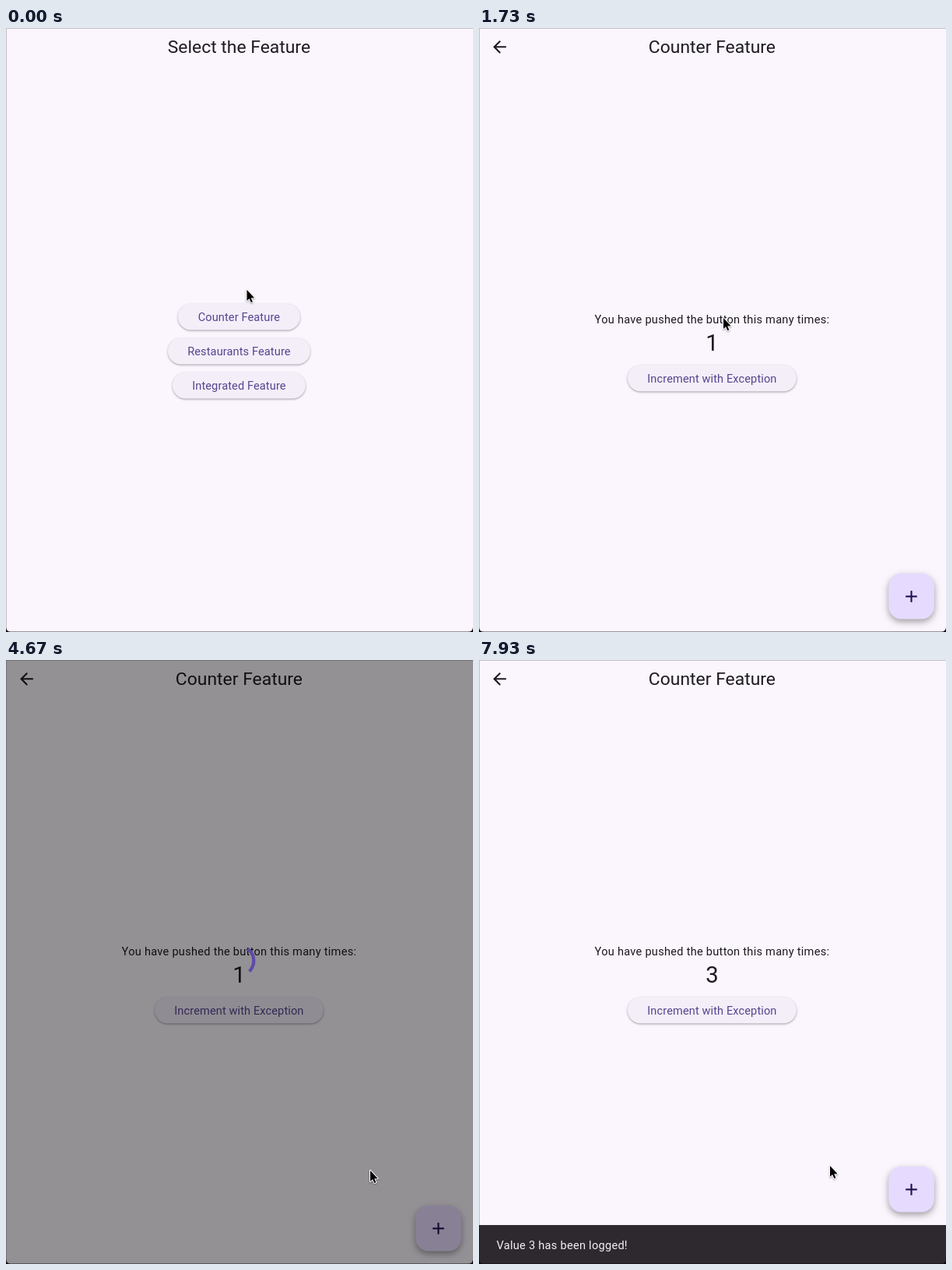
An HTML page with a canvas for the animation above (8000 ms loop, 600 by 775 pixels).

```html
<!DOCTYPE html>
<html lang="en">
<head>
<meta charset="utf-8">
<title>Counter Feature</title>
<style>
  html, body { margin: 0; width: 100%; height: 100%; overflow: hidden; background: #fbf5fd; }
  canvas { display: block; width: 600px; height: 775px; }
</style>
</head>
<body>
<canvas id="stage" width="600" height="775"></canvas>
<script>
const ctx = document.getElementById('stage').getContext('2d');
const W = 600, H = 775, MID = 299.4, LOOP = 8000, TAU = Math.PI * 2;
const SURFACE = '#fbf5fd', INK = '#1d1a20', PRIMARY = '#55458f', DEEP = '#1f0f52';

const PUSH = 600;
const LOADERS = [[685, 1690], [3715, 4690], [5653, 6680]];
const TIPS = [[3160, 3690], [5420, 5650]];
const HOVERS = [[3140, 3900], [5400, 5950]];
const CLICKS = [[3660, 567, 747], [5630, 563, 730]];
const SNACK = 7500;
// time, x, y of the pointer
const POINTER = [
  [70, 309.5, 336], [330, 314, 372], [2300, 314, 372], [2870, 448, 597], [2960, 448, 597],
  [3300, 566, 747], [4080, 566, 747], [4500, 468, 655], [5110, 468, 655], [5530, 563, 728],
  [5850, 563, 728], [6350, 451, 649]
];

const clamp = v => Math.max(0, Math.min(1, v));
const ramp = (t, a, b) => clamp((t - a) / (b - a));
const span = (t, [a, b], fade) => ramp(t, a, a + fade) * (1 - ramp(t, b, b + fade));
const strongest = (t, list, fade) => Math.max(...list.map(s => span(t, s, fade)));

function bezier(x, x0, y0, x1, y1, x2, y2, x3, y3) {
  const at = (s, a, b, c, d) =>
    (1 - s) ** 3 * a + 3 * (1 - s) ** 2 * s * b + 3 * (1 - s) * s * s * c + s ** 3 * d;
  let lo = 0, hi = 1;
  for (let i = 0; i < 24; i++) {
    const m = (lo + hi) / 2;
    if (at(m, x0, x1, x2, x3) < x) lo = m; else hi = m;
  }
  return at(lo, y0, y1, y2, y3);
}
const ease = (x, a, b, c, d) => x <= 0 ? 0 : x >= 1 ? 1 : bezier(x, 0, 0, a, b, c, d, 1, 1);
const fastOutSlowIn = x => ease(x, 0.4, 0, 0.2, 1);
function slideIn(x) {
  if (x <= 0 || x >= 1) return clamp(x);
  return x < 0.198
    ? bezier(x, 0, 0, 0.056, 0.024, 0.108, 0.3085, 0.198, 0.541)
    : bezier(x, 0.198, 0.541, 0.3655, 1, 0.5465, 0.989, 1, 1);
}

function text(str, x, y, size, color, spacing = 0, align = 'center') {
  ctx.font = `${size}px Roboto, sans-serif`;
  ctx.letterSpacing = spacing + 'px';
  ctx.textAlign = align;
  ctx.fillStyle = color;
  ctx.fillText(str, x, y);
}

function box(x, y, w, h, r, color) {
  ctx.beginPath();
  ctx.roundRect(x, y, w, h, r);
  ctx.fillStyle = color;
  ctx.fill();
}

function shadowBox(x, y, w, h, r, color, shade, blur, dy) {
  ctx.save();
  ctx.shadowColor = `rgba(0,0,0,${shade})`;
  ctx.shadowBlur = blur;
  ctx.shadowOffsetY = dy;
  box(x, y, w, h, r, color);
  ctx.restore();
}

function ripple(x, y, r, alpha, color) {
  if (alpha <= 0) return;
  ctx.beginPath();
  ctx.arc(x, y, r, 0, TAU);
  ctx.fillStyle = `rgba(${color},${alpha})`;
  ctx.fill();
}

function pill(label, y, w, hover = 0) {
  const x = MID - w / 2;
  shadowBox(x, y, w, 33.5, 16.75, '#f4eef9', 0.36, 2.5, 1);
  if (hover) box(x, y, w, 33.5, 16.75, `rgba(103,80,164,${0.08 * hover})`);
  text(label, MID, y + 22, 14.6, PRIMARY, 0.1);
}

function menuPage(t) {
  ctx.fillStyle = SURFACE;
  ctx.fillRect(0, 0, W, H);
  text('Select the Feature', MID, 32, 22.9, INK);
  pill('Counter Feature', 354, 157, ramp(t, 200, 300));
  pill('Restaurants Feature', 398, 183);
  pill('Integrated Feature', 442, 171);
  if (t > 540) {
    ctx.save();
    ctx.beginPath();
    ctx.roundRect(MID - 78.5, 354, 157, 33.5, 16.75);
    ctx.clip();
    ripple(314, 372, 10 + 90 * ramp(t, 540, 800), 0.1, '103,80,164');
    ctx.restore();
  }
}

const BACK = new Path2D('M20 11H7.83l5.59-5.59L12 4l-8 8 8 8 1.41-1.41L7.83 13H20v-2z');

function fab(t, lift) {
  const x = 526.3, y = 700 - lift, s = 58.6;
  shadowBox(x, y, s, s, 16.8, '#e6daff', 0.36, 8, 3.5);
  const hover = strongest(t, HOVERS, 90);
  if (hover) box(x, y, s, s, 16.8, `rgba(33,0,93,${0.1 * hover})`);
  ctx.save();
  ctx.beginPath();
  ctx.roundRect(x, y, s, s, 16.8);
  ctx.clip();
  for (const [at, cx, cy] of CLICKS) {
    if (t > at) ripple(cx, cy, 8 + 45 * ramp(t, at, at + 450), 0.12 * (1 - ramp(t, at + 250, at + 500)), '33,0,93');
  }
  ctx.restore();
  const cx = 555.5, cy = y + 29.4;
  ctx.fillStyle = DEEP;
  ctx.fillRect(cx - 7.3, cy - 1.05, 14.6, 2.1);
  ctx.fillRect(cx - 1.05, cy - 7.3, 2.1, 14.6);
}

function snackbar(t) {
  const h = 50 * ease(ramp(t, SNACK, SNACK + 250), 0.77, 0, 0.175, 1);
  if (h <= 0) return 0;
  ctx.save();
  ctx.beginPath();
  ctx.rect(0, H - h, W, h);
  ctx.clip();
  ctx.fillStyle = '#2e282f';
  ctx.fillRect(0, H - 50, W, 50);
  ctx.globalAlpha = ramp(t, SNACK + 100, SNACK + 150);
  text('Value 3 has been logged!', 22.5, 755.5, 14.6, '#f3edf4', 0.26, 'left');
  ctx.restore();
  return h;
}

function tooltip(t) {
  const alpha = strongest(t, TIPS, 120);
  if (!alpha) return;
  ctx.save();
  ctx.globalAlpha = alpha;
  box(515.7, 678.7, 75.2, 25.4, 4.2, 'rgba(89,84,91,0.92)');
  text('Increment', 553.3, 696, 12.55, '#fff', 0.26);
  ctx.restore();
}

function counterPage(t) {
  ctx.fillStyle = SURFACE;
  ctx.fillRect(0, 0, W, H);
  ctx.save();
  ctx.translate(26.5 - 12.55, 24.3 - 12.55);
  ctx.scale(1.046, 1.046);
  ctx.fillStyle = INK;
  ctx.fill(BACK);
  ctx.restore();
  text('Counter Feature', MID, 32, 22.9, INK);
  text('You have pushed the button this many times:', MID, 379, 14.6, INK, 0.26);
  const count = LOADERS.filter(l => t >= l[1]).length;
  text(String(count), MID, 414, 29.3, INK);
  pill('Increment with Exception', 432.7, 217);
  const lift = snackbar(t);
  fab(t, lift);
  tooltip(t);
}

function spinner(ms) {
  const cycle = (ms / 1333) % 1, turn = (ms / 2222) % 1;
  const head = fastOutSlowIn(clamp(cycle * 2)), tail = fastOutSlowIn(clamp(cycle * 2 - 1));
  const start = -Math.PI / 2 + tail * 1.5 * Math.PI + turn * TAU + cycle * Math.PI / 2;
  const sweep = Math.max((head - tail) * 1.5 * Math.PI, 0.01);
  ctx.beginPath();
  ctx.arc(MID, 386, 18.9, start, start + sweep);
  ctx.strokeStyle = '#5f4ba6';
  ctx.lineWidth = 4.2;
  ctx.lineCap = 'square';
  ctx.stroke();
}

function pages(t) {
  const p = ramp(t, PUSH, PUSH + 500);
  if (p >= 1) return counterPage(t);
  ctx.save();
  ctx.translate(-W / 3 * ease(p, 0.35, 0.91, 0.33, 0.97), 0);
  menuPage(t);
  ctx.restore();
  if (p <= 0) return;
  const x = W * (1 - slideIn(p));
  const edge = ctx.createLinearGradient(x - 30, 0, x, 0);
  edge.addColorStop(0, 'rgba(0,0,0,0)');
  edge.addColorStop(1, 'rgba(0,0,0,0.04)');
  ctx.fillStyle = edge;
  ctx.fillRect(x - 30, 0, 30, H);
  ctx.save();
  ctx.translate(x, 0);
  counterPage(t);
  ctx.restore();
}

function pointer(t) {
  let i = 0;
  while (i < POINTER.length - 1 && POINTER[i + 1][0] <= t) i++;
  const [t0, x0, y0] = POINTER[i], [t1, x1, y1] = POINTER[i + 1] || [t0 + 1, x0, y0];
  const k = ramp(t, t0, t1), e = k * k * (3 - 2 * k);
  ctx.save();
  ctx.translate(x0 + (x1 - x0) * e, y0 + (y1 - y0) * e);
  ctx.beginPath();
  for (const [x, y] of [[0, 0], [0, 14], [3.1, 11.2], [5.4, 16.2], [7.4, 15.3], [5.2, 10.4], [9.6, 10.2]]) ctx.lineTo(x, y);
  ctx.closePath();
  ctx.lineJoin = 'round';
  ctx.lineWidth = 2;
  ctx.strokeStyle = '#fff';
  ctx.shadowColor = 'rgba(0,0,0,0.35)';
  ctx.shadowBlur = 2;
  ctx.shadowOffsetY = 1;
  ctx.stroke();
  ctx.shadowColor = 'transparent';
  ctx.fillStyle = '#000';
  ctx.fill();
  ctx.restore();
}

function windowEdge() {
  ctx.fillStyle = 'rgba(0,0,0,0.22)';
  ctx.fillRect(0, 0, W, 1);
  ctx.fillRect(0, 1, 1, H - 1);
  ctx.fillStyle = 'rgba(0,0,0,0.4)';
  ctx.fillRect(1, H - 1, W - 1, 1);
  ctx.beginPath();
  ctx.rect(0, 0, W, H);
  ctx.roundRect(0, -20, W, H + 20, 6);
  ctx.fillStyle = '#0c0a0d';
  ctx.save();
  ctx.clip('evenodd');
  ctx.fillRect(0, H - 8, W, 8);
  ctx.restore();
}

function draw(t) {
  pages(t);
  const load = LOADERS.find(([a, b]) => t >= a && t < b);
  if (load) {
    ctx.fillStyle = 'rgba(0,0,0,0.41)';
    ctx.fillRect(0, 0, W, H);
    spinner(t - load[0]);
  }
  windowEdge();
  pointer(t);
}

const began = performance.now();
function tick() {
  draw((performance.now() - began) % LOOP);
  requestAnimationFrame(tick);
}
tick();
</script>
</body>
</html>
```
